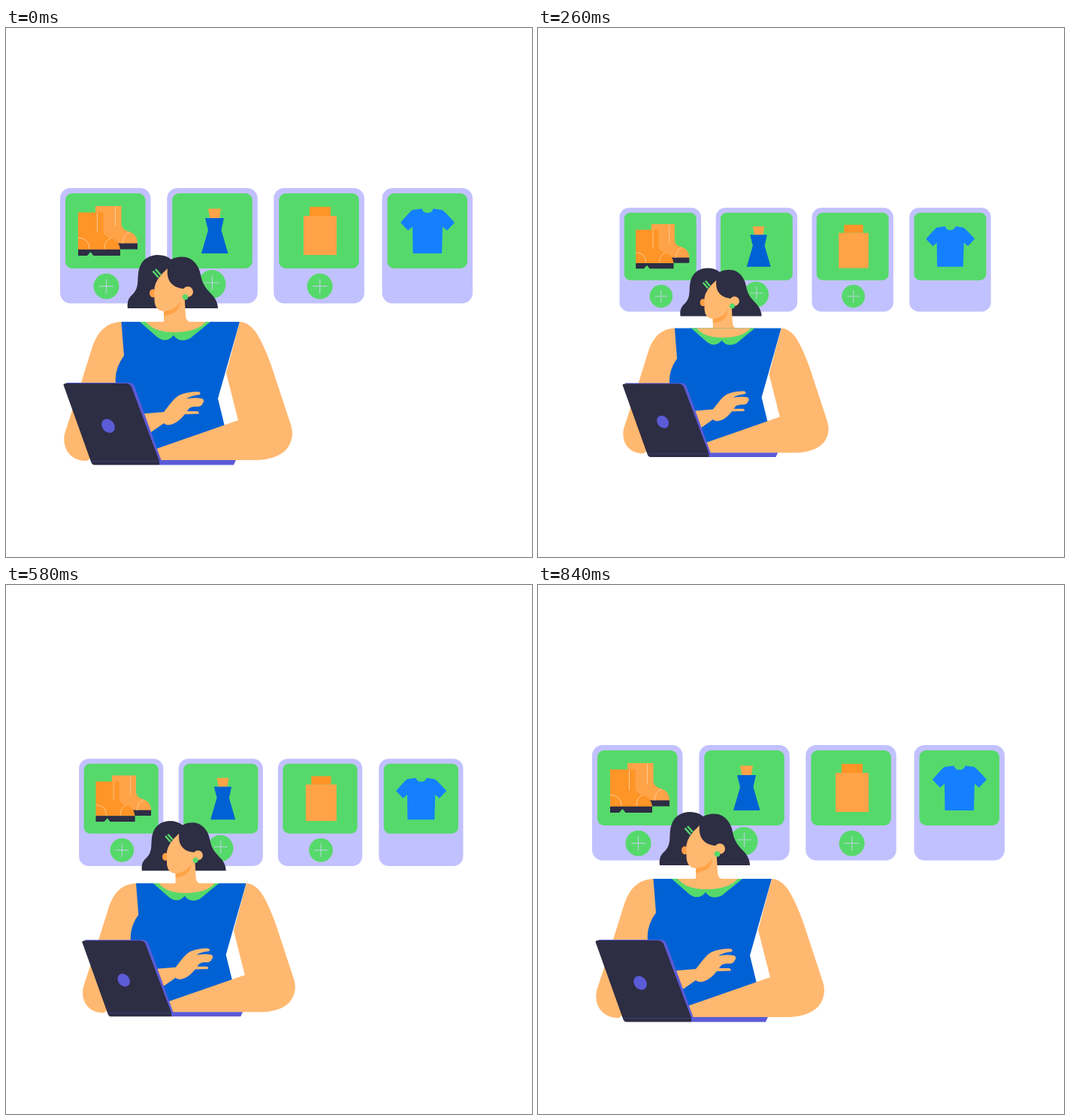
These frames come from a looping animation (700x704 px, 2.98 s). An HTML page:

```html
<!DOCTYPE html>
<html lang="en">
<head>
<meta charset="utf-8">
<title>Online shopping</title>
<style>
html, body { margin: 0; height: 100%; overflow: hidden; background: #fff; }
svg { display: block; width: 700px; height: 704px; }
.skin { fill: #ffb870; }
.green { fill: #56d96b; }
.dark { fill: #2d2d44; }
.blue { fill: #0061d5; }
.orange { fill: #ff9427; }
.peach { fill: #ffa348; }
.purple { fill: #5b5bd6; }
.seam { fill: none; stroke: #ffcb94; stroke-width: 1; }
.plus { fill: none; stroke: #b4d3d8; stroke-width: 1.2; }
.clip { fill: none; stroke: #56d96b; stroke-width: 2.6; }
</style>
</head>
<body>
<svg viewBox="0 0 700 704">
<defs>
  <g id="card">
    <rect width="120.5" height="153.5" rx="14" fill="#c2c1ff"/>
    <rect class="green" x="7" y="7" width="106.5" height="100" rx="9"/>
  </g>
  <path id="plus" class="plus" d="M-9.5 0H9.5M0-9.5V9.5"/>
</defs>
<g id="scene">
  <use href="#card" x="72" y="213"/>
  <use href="#card" x="214.3" y="213"/>
  <use href="#card" x="356.3" y="213"/>
  <use href="#card" x="500.5" y="213"/>

  <circle class="green" cx="133.5" cy="343.7" r="17"/>
  <ellipse class="green" cx="274" cy="341" rx="18.5" ry="19"/>
  <circle class="green" cx="417.7" cy="343.7" r="17"/>
  <use href="#plus" x="133.5" y="343.7"/>
  <use href="#plus" x="274.5" y="339"/>
  <use href="#plus" x="417.7" y="343.7"/>

  <!-- boots -->
  <path class="peach" d="M119 237H153.5V262Q156 270 164 271Q175 275 175 287H119Z"/>
  <path class="dark" d="M148 286.5H175V294.5H148Z"/>
  <path class="orange" d="M96 245.5H129.5V270Q130 278 139 279Q151 283 152 295H96Z"/>
  <path class="dark" d="M96 294.7H152V303H116.5L112.5 298L108 303H96Z"/>
  <path class="seam" d="M121.5 246V272M145.5 238V264M96 279Q111 280 111 294M131 294Q131 282 140 279.5M155 287Q156 274 165 271.5"/>

  <!-- dress -->
  <path class="peach" d="M269 240.5H286L284 253H271.5Z"/>
  <path class="blue" d="M265 253H290L286.5 269L295.5 300H260L269 269Z"/>

  <!-- bottle -->
  <path class="orange" d="M404 238H432V250H404Z"/>
  <path class="peach" d="M396 250H440V302H396Z"/>

  <!-- shirt -->
  <path fill="#1480ff" d="M541 242L553.5 240.5Q555 246 561 246Q567 246 568.5 240.5L580 242Q584 244 597 259L587 269.5L581 264.5L580 300H541.5L541 264.5L535 269.5L525 259Q538 244 541 242Z"/>

  <!-- head -->
  <path class="dark" d="M162 373Q160 361 169 354C179 344 173 331 178 318C182 307 192 302 202 302Q213 302 220 308C226 304 238 303 245 307C255 313 258 322 260 333C263 345 270 350 276 357Q282 365 282 373Z"/>
  <ellipse cx="195.5" cy="353" rx="4.5" ry="5.5" fill="#ff9e45"/>
  <path class="skin" d="M215 320C213 337 222 346 237 347L239 382Q239 391 247 391.5H210V377Q198 376 197.5 362V346Q199 334 215 320Z"/>
  <path class="peach" d="M210 377Q227 375 232 363Q232 381 210 383Z"/>
  <circle class="skin" cx="242" cy="351" r="7"/>
  <circle class="green" cx="238.5" cy="358" r="3.8"/>
  <path class="clip" d="M195.5 323.5L203 332M199 321L206 329"/>

  <!-- body -->
  <path class="skin" d="M154 391C130 392 121 408 115 424L100 472L78 540C74 562 88 577 108 576L150 540V470L158 436Z"/>
  <path class="blue" d="M153.5 391H311L282 493L291 530L200 564L160 540L146 473Q144 454 157 436Z"/>
  <path class="green" d="M178 391L202 412Q214 420 223 409Q231 420 245 413L272 391Z"/>
  <path class="skin" d="M186 391Q197 405 225 405Q254 405 266 391Z"/>
  <path class="skin" d="M311 391Q322 391 332 404Q344 422 356 458L379 528Q385 546 373 561Q360 574 335 575H204L200 560L309 522L293 459Z"/>
  <path class="skin" d="M180 513.5L210 511C216 504 222 494 230 489Q240 484 256 484Q260 485 258 488Q246 489 240 493.5Q254 491 262 493.5Q264.500 497 262 499Q261 503 256 504Q247 503 243 507L241 510H255Q258 512 256 513.500L238 514Q230 524 222 527Q214 530 210 526L190 540Z"/>

  <!-- laptop -->
  <path class="purple" d="M80 472H164Q169 472.5 171 477L206.500 575H306L303 581.5H204Z"/>
  <path class="dark" d="M76.500 475Q76.500 473 80 473H160Q165 473.500 167 477.500L204 576V581.5H118Q114.500 581.5 113 577Z"/>
  <path d="M114 576.500H204" stroke="#46468a" stroke-width=".7"/>
  <ellipse class="purple" cx="136" cy="529.500" rx="8" ry="10" transform="rotate(-40 136 529.5)"/>
</g>
</svg>
<script>
const LOOP = 2980, STEP = 20, LOW = 360, END = 840, DEPTH = 0.1215;
const PIVOT = [438, 477];
const scene = document.getElementById('scene');
const ease = u => (1 - Math.cos(Math.PI * u)) / 2;

// Shrinks until LOW, grows back until END, then rests.
function scaleAt(t) {
  if (t >= END) return 1;
  return 1 - DEPTH * (t < LOW ? ease(t / LOW) : ease((END - t) / (END - LOW)));
}

function draw() {
  const t = Math.floor(performance.now() % LOOP / STEP) * STEP;
  const s = scaleAt(t);
  const [x, y] = PIVOT.map(p => p * (1 - s));
  scene.setAttribute('transform', `translate(${x} ${y}) scale(${s})`);
  requestAnimationFrame(draw);
}
draw();
</script>
</body>
</html>
```
